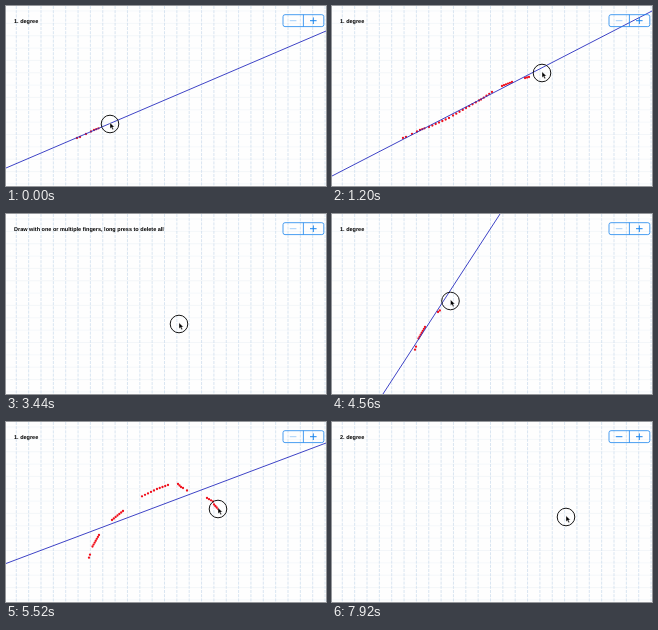
An HTML page for the animation above (8000 ms loop, 320 by 180 pixels).

```html
<!DOCTYPE html>
<html lang="en">
<head>
<meta charset="utf-8">
<title>Curve fitting</title>
<style>
  html, body { margin: 0; width: 100%; height: 100%; overflow: hidden; background: #fff; }
  svg { display: block; width: 100vw; height: 100vh; }
  text { font: bold 5.52px "Liberation Sans", Arial, sans-serif; text-rendering: geometricPrecision; }
</style>
</head>
<body>
<svg viewBox="0 0 320 180">
  <rect width="320" height="180" fill="#fefefe"/>
  <path id="rows" stroke="#eff4f8" stroke-width=".7"/>
  <path id="cols" stroke="#d0dfee" stroke-width=".8" stroke-dasharray="3 1.2"/>
  <g id="dots" fill="#f0101c"></g>
  <path id="curve" fill="none" stroke="#2a2fc0" stroke-width=".9"/>
  <text id="label" x="8" y="16.8"></text>
  <g fill="none" stroke="#1c86ee">
    <rect x="277" y="8.7" width="40.8" height="11.9" rx="2" stroke-width=".8"/>
    <path d="M297.4 8.7v11.9" stroke-width=".8"/>
    <path id="minus" d="M283.8 14.7h6.6"/>
    <path d="M304 14.7h6.6M307.3 11.4v6.6"/>
  </g>
  <g id="cursor">
    <circle id="ring" r="8.8" fill="none" stroke="#161616"/>
    <path d="M0 -1.2V4.6L1.4 3.4L2.5 5.8L3.6 5.3L2.6 3H4.4Z" fill="#000" stroke="#fff" stroke-width=".4"/>
  </g>
</svg>
<script>
const LOOP = 8000, STEP = 80;
const $ = id => document.getElementById(id);

// Runs of dots: [x, y, dx, dy, count]
const firstRuns = [
  [71, 132, 3, -1, 2], [80, 128, 5, -2.5, 2], [88, 124, 4.5, -1.7, 3],
  [97, 121, 20, -9, 7], [121, 109.5, 26, -15, 9], [149, 93.5, 11, -7.5, 5],
  [170, 80, 10, -4, 6], [193, 72, 4, -1, 3], [207, 67, 9.5, -5.8, 4]
];
const secondRuns = [
  [83, 135.7, 1, -3, 2], [86.5, 124.5, 6.5, -11.5, 7], [106, 98, 11, -9, 7],
  [136, 74.3, 12, -5.8, 5], [151, 67, 11, -4, 5], [172, 62, 3, 3, 3],
  [177, 66, 4, 2.5, 2], [201, 76, 6, 3.5, 4], [208, 82.5, 4, 4.5, 4]
];

// Tracks: [time, values...]
const pointer = [
  [0, 104, 118], [400, 139, 100], [1200, 210, 67], [1440, 217, 61],
  [1840, 217, 61], [2640, 173, 110], [3680, 173, 110], [3920, 83, 136], [4160, 83, 136],
  [4560, 118.5, 87], [4800, 150, 67], [5120, 190, 71], [5440, 212, 87],
  [5600, 212, 87], [6080, 304, 17], [6320, 304, 17], [6640, 234, 95]
];
const firstHead = [[0, 93], [1200, 199], [1440, 218]];
const secondHead = [[4160, 83], [4400, 94], [4560, 108.2], [5120, 176], [5440, 213]];
// Height of the fitted line at the left and right edge
const firstLine = [[0, 162, 25], [400, 168, 12], [1000, 173, 2], [1200, 170, 5], [1440, 169, 9]];
const secondLine = [[4240, 385, -575], [4560, 258.4, -233.8], [5120, 186.2, -61], [5440, 141.5, 21]];
const presses = [[0, 1600], [2880, 3600], [4160, 5560], [7360, LOOP]];

function sample(track, t) {
  if (t <= track[0][0]) return track[0].slice(1);
  const i = track.findIndex(k => k[0] > t);
  if (i < 0) return track[track.length - 1].slice(1);
  const a = track[i - 1], b = track[i], f = (t - a[0]) / (b[0] - a[0]);
  return a.slice(1).map((v, n) => v + (b[n + 1] - v) * f);
}

function addDots(runs) {
  const list = [];
  for (const [x0, y0, dx, dy, count] of runs) {
    for (let i = 0; i < count; i++) {
      const f = i / (count - 1), x = x0 + dx * f;
      const c = document.createElementNS("http://www.w3.org/2000/svg", "circle");
      c.setAttribute("cx", x);
      c.setAttribute("cy", y0 + dy * f);
      c.setAttribute("r", 1.15);
      $("dots").append(c);
      list.push({ c, x });
    }
  }
  return list;
}
const first = addDots(firstRuns), second = addDots(secondRuns);

function showDots(list, on, head) {
  for (const { c, x } of list) c.style.display = on && x <= head ? "" : "none";
}

function gridPath(from, to, make) {
  let d = "";
  for (let p = from; p < to; p += 12.35) d += make(p.toFixed(2));
  return d;
}
$("cols").setAttribute("d", gridPath(10.3, 320, x => `M${x} 0V180`));
$("rows").setAttribute("d", gridPath(5, 180, y => `M0 ${y}H320`));

function curvePath(t) {
  if (t >= 7920 || (t >= 3440 && t < 4240)) return "";
  if (t >= 6240) return "M57 180Q165.7 -51 274.4 180";
  const [l, r] = sample(t < 3440 ? firstLine : secondLine, t);
  return `M0 ${l}L320 ${r}`;
}

function draw(t) {
  const quadratic = t >= 6240;
  showDots(first, t < 3440, sample(firstHead, t)[0]);
  showDots(second, t >= 4160 && t < 7920, sample(secondHead, t)[0]);
  $("curve").setAttribute("d", curvePath(t));
  $("label").textContent = t >= 3440 && t < 4160
    ? "Draw with one or multiple fingers, long press to delete all"
    : (quadratic ? 2 : 1) + ". degree";
  $("minus").setAttribute("stroke-opacity", quadratic ? 1 : 0.4);
  $("cursor").setAttribute("transform", `translate(${sample(pointer, t)})`);
  $("ring").style.display = presses.some(([a, b]) => t >= a && t < b) ? "" : "none";
}

const start = performance.now();
function frame() {
  const t = (performance.now() - start) % LOOP;
  draw(Math.floor(t / STEP) * STEP);
  requestAnimationFrame(frame);
}
frame();
</script>
</body>
</html>
```
